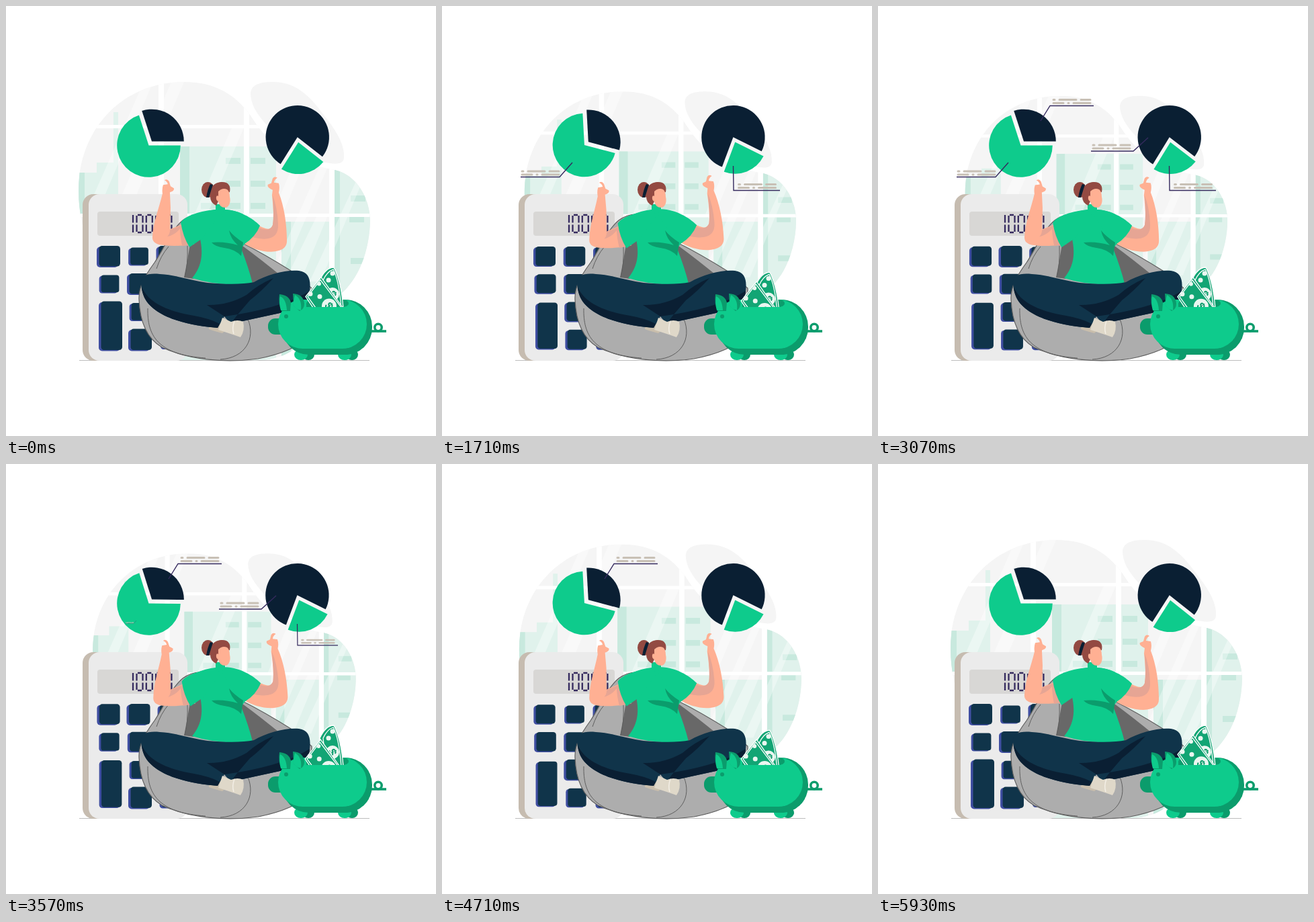
Recreate the animation shown at these times as an HTML page. Size 640 px wide and 640 px high, loop 6 s.

```html
<!DOCTYPE html>
<html lang="en">
<head>
<meta charset="utf-8">
<title>Savings balance</title>
<style>
html, body { margin: 0; width: 100%; height: 100%; overflow: hidden; background: #fff; }
svg { display: block; width: 100%; height: 100%; }
.mint { fill: #e0f2ec; } .teal { fill: #c8e9de; } .pale { fill: #f5f5f5; }
.green { fill: #0ecb8c; } .deep { fill: #0b9c6c; } .navy { fill: #0a1f33; } .blue { fill: #10344a; }
.skin { fill: #ffb093; } .tan { fill: #e6a594; } .hair { fill: #934a42; }
.seam { fill: none; stroke: #5f5f5f; stroke-width: 1; }
.dash { fill: none; stroke: #c8c0b5; stroke-width: 3; stroke-linecap: round; }
.lead { fill: none; stroke: #352a5e; stroke-width: 1.4; }
.note { fill: #12a574; stroke: #fff; stroke-width: 1.3; }
.coin { fill: #eaf6f0; }
.sign { font: bold 17px "Liberation Sans", Arial, sans-serif; fill: #0b9c6c; text-anchor: middle; }
</style>
</head>
<body>
<svg viewBox="0 0 640 640">
<defs>
  <clipPath id="blob"><path d="M108 276C107 185 172 113 265 113C313 113 342 133 364 163C386 198 415 230 484 243C522 248 542 287 542 320C541 365 525 405 500 427C460 475 440 527 375 527H180C140 500 130 400 113 322Q108 298 108 276Z"/></clipPath>
  <clipPath id="slot"><path d="M400 300H560V448H400Z"/></clipPath>
</defs>

<g id="room">
  <path class="pale" d="M364 130C365 116 380 113 397 113C436 113 456 139 479 170C496 192 504 210 503 226C502 238 486 235 470 232C432 226 412 202 388 177C374 162 364 146 364 130Z"/>
  <g clip-path="url(#blob)">
    <path class="pale" d="M100 100H560V540H100Z"/>
    <path class="mint" d="M100 248H135V233H160V158H167V310H100ZM259 209H402V540H259ZM410 321H481V540H410ZM489 240H560V540H489Z"/>
    <path class="teal" d="M100 248H117V310H100ZM259 209H273V310H259ZM410 321H424V540H410ZM489 240H497V540H489Z"/>
    <path class="teal" d="M327 226h22v9h-22zM364 226h22v9h-22zM327 260h22v9h-22zM364 260h22v9h-22zM290 293h22v9h-22zM327 293h22v9h-22zM364 293h22v9h-22zM513 282h22v9h-22zM511 314h22v8h-22zM513 375h22v9h-22z"/>
    <path fill="#fff" opacity=".35" d="M205 113H219L135 310H118ZM246 113H265L182 310H160ZM336 181H354L300 309H281ZM470 232H482L402 420H386ZM428 235H443L412 309H397ZM462 314H478L430 430H405ZM526 250H535L468 410H452Z"/>
    <path fill="#fff" d="M100 177H400V182H100ZM100 309H560V314H100ZM227 100H235V540H227ZM354 100H362V540H354ZM481 235H489V540H481Z"/>
  </g>
</g>

<path d="M109 527.5H541" stroke="#bdbdbd"/>

<rect x="114" y="280" width="90" height="248" rx="16" fill="#c6bcb0"/>
<rect x="123" y="280" width="147" height="248" rx="16" fill="#ebebeb"/>
<rect x="136" y="306" width="121" height="36" rx="4" fill="#d8d7d5"/>
<g id="digits" fill="none" stroke="#352a5e" stroke-width="2.3"><path d="M189 311V322.5M189 325.5V337"/></g>
<g id="keys"></g>

<path d="M198 437C197 418 207 401 221 382C236 360 245 334 263 319C279 307 300 307 318 319L352 353Q384 369 424 394L455 420V490C435 507 412 518 375 525C325 532 270 526 232 508C207 493 199 465 198 437Z" fill="#adadad" stroke="#5f5f5f" stroke-width="1.2"/>
<path d="M274 354L291 346L293 386L279 406L265 404Q270 380 274 354ZM340 352L352 357Q378 376 411 403L366 412Z" fill="#686868"/>
<path class="seam" d="M270 357Q271 385 266 404M224 391Q230 372 242 358M211 450C210 490 225 519 297 524M360 466C372 495 356 524 319 526"/>

<g id="leftPie"></g>
<g id="rightPie"></g>
<g id="labels"></g>

<g id="leftArm">
  <path class="skin" d="M236 259Q240 256 243 261L245 268L250 271Q251 275 244 277L245 300L244 332L274 320L280 354Q260 358 236 356Q216 355 218 342C219 322 228 300 233 279Q232 272 234 266L241 265Q240 261 236 259Z"/>
  <path class="tan" d="M244 333L274 321L280 354L262 357Q259 342 259 331Q252 340 240 343Q244 339 244 333Z"/>
</g>
<g id="rightArm">
  <path class="skin" d="M404 256Q400 253 397 257L395 264L390 266Q388 270 397 274L396 282C398 300 399 318 397 326C394 336 386 332 372 325L350 351C365 361 380 366 395 366Q418 365 418 350C418 325 414 298 406 278Q408 270 406 264L399 263Q400 258 404 256Z"/>
  <path class="tan" d="M397 282Q404 300 405 325C406 345 392 351 367 344L376 330C388 335 394 333 397 326Q399 310 397 282Z"/>
</g>

<path class="green" d="M312 295H326V303Q342 304 353 310L356 353L350 361Q361 389 367 413Q318 418 277 405C293 386 293 366 289 347L280 312Q298 304 312 303Z"/>
<path id="leftSleeve" class="green" d="M312 303C290 305 268 311 260 322Q263 343 273 359L292 346L318 310Z"/>
<path id="rightSleeve" class="green" d="M325 303C347 304 366 315 378 327Q371 344 355 354L340 340L320 310Z"/>
<path class="deep" d="M332 334Q339 343 353 352L350 372Q341 362 325 360Q311 358 306 352Q325 350 345 356Q334 346 332 334Z"/>

<ellipse class="hair" cx="300.500" cy="273.500" rx="9.500" ry="11.500"/>
<path class="hair" d="M304 284C302 269 311 262 322 262C331 262 335 268 333 277L320 282L313 297Q304 293 304 284Z"/>
<path class="navy" d="M304 265L308 266Q305 275 302 285L298 285Q300 273 304 265Z"/>
<path class="skin" d="M316 276Q322 270 329 273Q333 276 333 284C335 292 332 300 326 300Q318 300 316 291Q312 289 313 284Q314 281 316 283Z"/>

<path d="M302 478L318 472L330 480L322 487Q310 484 302 481Z" fill="#c9beac"/>
<path class="blue" d="M201 414C199 402 209 397 229 399C251 400 274 408 300 412Q345 416 369 411C389 399 418 392 436 394C451 396 454 408 452 424C451 442 436 449 417 455L334 473L325 462L315 479C273 476 221 464 206 434Q202 425 201 414Z"/>
<path class="navy" d="M202 418C212 443 244 455 280 461Q303 465 318 473L315 479C273 476 221 464 206 434Q202 425 202 418ZM299 445Q330 446 358 430Q376 414 398 405Q380 425 363 438L345 459L325 462ZM452 424C451 442 436 449 417 455L334 473L345 459Q416 447 452 424Z"/>
<path d="M322 464L335 470Q345 466 353 470Q356 483 349 493Q338 489 316 482Z" fill="#dfd8c9"/>
<path d="M340 469Q336 479 339 488" fill="none" stroke="#f3eee5" stroke-width="1.500"/>

<g class="deep"><ellipse cx="450" cy="519" rx="9" ry="8"/><ellipse cx="515" cy="519" rx="9" ry="8"/></g>
<g class="green"><ellipse cx="439" cy="519" rx="10" ry="8"/><ellipse cx="504" cy="519" rx="10" ry="8"/></g>
<g class="deep">
  <rect x="390" y="465" width="30" height="24" rx="11"/>
  <rect x="411" y="437" width="134" height="82" rx="40"/>
</g>
<rect class="green" x="405" y="437" width="132" height="73" rx="36.500"/>
<path class="deep" d="M447 448V442Q450 437 460 437H500Q510 437 510 443Q509 448 500 448Z"/>
<g clip-path="url(#slot)">
  <g id="backNote">
    <path class="note" d="M467 408C473 395 481 389 488 389C497 407 502 431 503 470H475Z" stroke="none"/>
    <path class="note" d="M472 408Q478 395 487 392Q498 413 500 470H478Z"/>
    <g class="coin"><circle cx="486" cy="398" r="3.500"/><circle cx="480" cy="408" r="3.500"/><circle cx="486" cy="429" r="10"/></g>
    <text class="sign" transform="translate(486 429) rotate(65)" y="6">$</text>
  </g>
  <g id="frontNote">
    <path class="note" d="M469 403L446 432L475 475L508 458Z" stroke="none"/>
    <path class="note" d="M468 407L449 432L478 472L505 456Z"/>
    <g class="coin"><circle cx="467" cy="432" r="3.500"/><circle cx="453" cy="428" r="3.500"/><circle cx="466" cy="413" r="3"/><circle cx="481" cy="446" r="11"/></g>
    <text class="sign" transform="translate(481 446) rotate(55)" y="6">$</text>
  </g>
</g>
<path class="deep" d="M407 429Q421 430 424 441L423 454H410Q405 442 407 429ZM427 428Q443 429 444 443Q444 451 437 454L428 446Z"/>
<path class="green" d="M408 432Q417 436 418 453L409 453Q406 442 408 432ZM430 430Q441 436 439 453Q430 451 427 444Z"/>
<circle class="deep" cx="417" cy="462" r="3"/>
<g fill="none" stroke="#0b9c6c" stroke-width="3.600"><path d="M543 484H566"/><circle cx="554" cy="478.500" r="5.200"/></g>
</svg>

<script>
const $ = id => document.getElementById(id);
const add = (id, markup) => $(id).insertAdjacentHTML('beforeend', markup);
const move = (id, value) => $(id).setAttribute('transform', value);
const LOOP = 6000, CYCLE = 3000;

// Cubic ease in and out from 0 to 1 between times a and b.
function ease(t, a, b) {
  const u = Math.min(1, Math.max(0, (t - a) / (b - a)));
  return u < .5 ? 4 * u ** 3 : 1 - 4 * (1 - u) ** 3;
}
const bump = (t, a, b, c, d) => ease(t, a, b) - ease(t, c, d);
const cyclic = (t, ...span) => [-CYCLE, 0, CYCLE]
  .reduce((sum, shift) => sum + bump(t % CYCLE + shift, ...span), 0);

function slice(cx, cy, r, from, to, cls) {
  const at = deg => {
    const a = deg * Math.PI / 180;
    return `${cx + r * Math.cos(a)} ${cy + r * Math.sin(a)}`;
  };
  return `<path class="${cls}" d="M${cx} ${cy}L${at(from)}A${r} ${r} 0 ${+(to - from > 180)} 1 ${at(to)}Z"/>`;
}
add('leftPie', slice(212.5, 207.5, 47.3, 0, 252, 'green') + slice(217, 201.5, 47.8, -108, 0, 'navy'));
add('rightPie', slice(433.8, 195.2, 47.2, 123, 399, 'navy') + slice(435, 202.8, 47.3, 39, 123, 'green'));

for (let i = 0; i < 4; i++) {
  const x = 194.5 + 14.3 * i;
  add('digits', `<path d="M${x + 1.5} 311h6M${x + 1.5} 337h6M${x} 312V322.5M${x} 325.5V336M${x + 9} 312V322.5M${x + 9} 325.5V336"/>`);
}

// x, y, height, growth at each of KEY_TIMES
const KEY_TIMES = [0, 930, 2430, 3570, 4210, 5140, LOOP];
const keys = [
  [152.5, 373, 32, [1, .93, .35, .85, 0, .85]],
  [197, 373, 32, [0, 0, 1, 1, 0, 0]],
  [241, 373, 32, [1, .2, .6, .2, .1, 1]],
  [153.5, 414, 32, [0, .1, .75, .1, 1, .2]],
  [197.5, 414, 32, [1, .4, .7, .7, 0, .9]],
  [155.5, 476.5, 74, [1, .93, .35, .75, 0, .75]],
  [198.5, 455.5, 32, [0, 0, 1, 0, 1, .8]],
  [199.5, 497, 33, [1, 1, 0, 1, .15, .1]],
  [245, 497, 33, [0, .3, .3, .6, 1, .3]]
];
keys.forEach(([, , h], i) => add('keys', `<g id="key${i}">
  <rect x="-17.5" y="${1.5 - h / 2}" width="32" height="${h - 1.5}" rx="5" fill="#3f4ea1"/>
  <rect class="blue" x="-14" y="${-h / 2}" width="31.5" height="${h - 1.5}" rx="4.5"/></g>`));
function growth(values, t) {
  const i = KEY_TIMES.findLastIndex(k => k <= t);
  const u = (t - KEY_TIMES[i]) / (KEY_TIMES[i + 1] - KEY_TIMES[i]);
  const next = values[(i + 1) % values.length];
  return values[i] + (next - values[i]) * (1 - Math.cos(Math.PI * u)) / 2;
}

// anchor, leader line, first dash, visible span
const labels = [
  [194, 233, 'L175 254.5H117', 119, 246, [480, 1080, 3100, 3850]],
  [242, 171, 'L256 148.5H321', 261, 139.5, [1950, 2550, 4880, 5480]],
  [402, 196, 'L380 216H317', 320, 207, [1800, 2400, 4040, 4640]],
  [433.5, 238, 'L434 274.5H503', 441.5, 265.5, [300, 900, 3380, 3980]]
];
labels.forEach(([x, y, line, dx, dy], i) => add('labels', `<g id="label${i}">
  <path class="lead" d="M${x} ${y}${line}"/>
  <path class="dash" d="M${dx} ${dy}h2m7 0h25m7 0h14M${dx} ${dy + 5}h15m7 0h1m7 0h25"/></g>`));

const spin = (deg, x, y) => `rotate(${deg} ${x} ${y})`;
const zoom = (s, x, y) => `translate(${x} ${y}) scale(${s}) translate(${-x} ${-y})`;

function draw(now) {
  const t = now % LOOP;
  const sway = cyclic(t, -360, 1140, 1140, 2640);
  const turn = cyclic(t, 380, 1280, 1500, 3150);
  const dip = cyclic(t, 700, 1500, 1550, 3200);

  move('room', zoom(1 - .1 * bump(t, 0, 3000, 3000, LOOP), 325, 320));
  move('leftPie', spin(15 * turn, 214.5, 205));
  move('rightPie', spin(-16 * sway, 434, 197));
  move('leftArm', `translate(0 ${5 * sway}) ` + spin(-3 * sway, 240, 310));
  move('rightArm', `translate(0 ${-4 * sway}) ` + spin(-3 * sway, 405, 315));
  move('leftSleeve', `translate(${2 * sway} ${2 * sway})`);
  move('rightSleeve', `translate(${1.5 * sway} ${-sway})`);
  move('backNote', `translate(0 ${7.5 * dip})`);
  move('frontNote', `translate(${-sway} ${9 * sway})`);

  keys.forEach(([x, y, , values], i) =>
    move('key' + i, `translate(${x} ${y}) scale(${.85 + .15 * growth(values, t)})`));
  labels.forEach(([x, y, , , , span], i) => {
    const s = bump(t, ...span);
    $('label' + i).style.display = s > .01 ? '' : 'none';
    move('label' + i, zoom(s, x, y));
  });
}

const start = performance.now();
(function tick() {
  draw(performance.now() - start);
  requestAnimationFrame(tick);
})();
</script>
</body>
</html>
```
